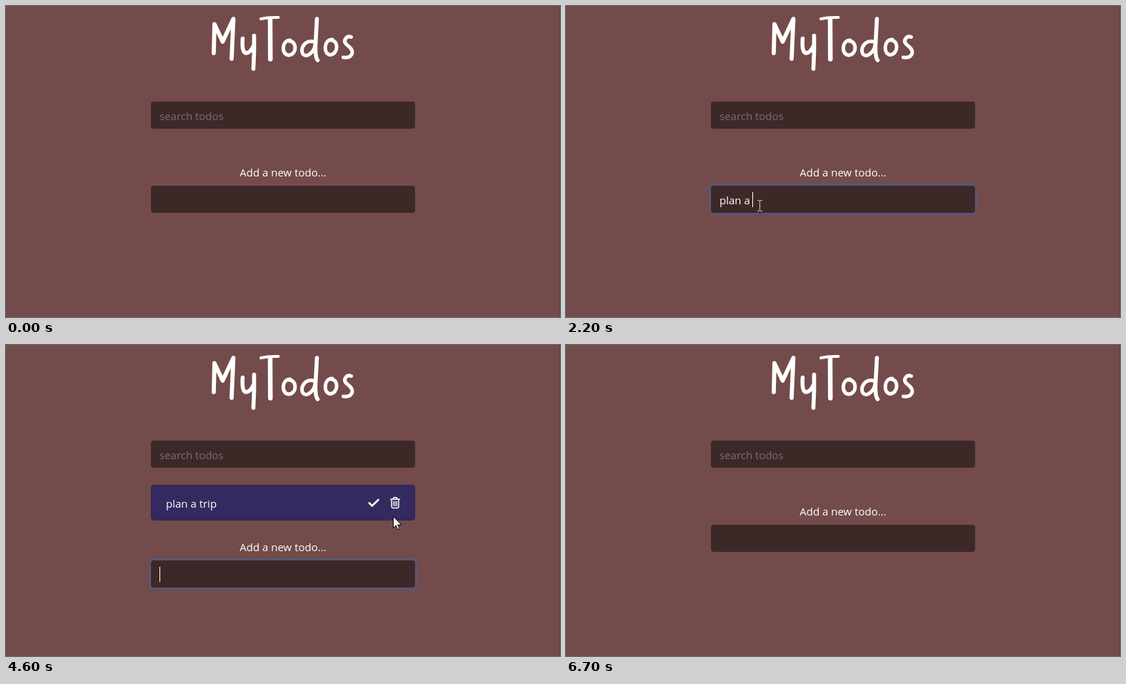
Write an HTML page that moves like this. It is 776 by 436 pixels and loops after 7100 ms.

```html
<!DOCTYPE html>
<html lang="en">
<head>
<meta charset="utf-8">
<title>Todo list</title>
<style>
  html, body { margin: 0; height: 100%; overflow: hidden; background: #734b4a; }
  svg { display: block; width: 100%; height: 100%; }
  text { font: 500 15px "Open Sans", "Noto Sans", sans-serif; fill: #fff; white-space: pre; }
  .field { fill: #3d2828; }
  .line { fill: none; stroke: #fff; stroke-linecap: round; stroke-linejoin: round; }
  .done text { fill: #858389; }
  .done .line { stroke: #858389; }
  .strike { display: none; }
  .done .strike { display: inline; }
  .pointer { fill: #fff; stroke: #000; stroke-linejoin: round; }
</style>
</head>
<body>
<svg viewBox="0 0 776 436">
  <rect x="775" width="1" height="436" opacity=".15"/>

  <g class="line" stroke-width="5.6" role="img" aria-label="MyTodos">
    <path d="M291 66 292 25.500 303.500 50 318.500 18 316 74" stroke-width="5.800"/>
    <path d="M331.500 45.500Q330 65.500 336 66 343 65.500 347 55M347.500 41.500Q348 66 346.500 88"/>
    <path d="M357 18Q368 15.500 381.500 16" stroke-width="4"/>
    <path d="M370 18 370.300 74.500" stroke-width="6.500"/>
    <path d="M398 48C386 47.500 385 68.500 396 69 408 68.500 408 48.500 396 49" stroke-width="5"/>
    <path d="M432 50.500C419 45.500 411 60.500 416 67.500 421 73.500 432 64.500 433 54.500" stroke-width="5"/>
    <path d="M435.500 18 433.500 55Q433 72 436.500 76"/>
    <path d="M457 47C445 46.500 444 67.500 454 68.500 466 67.500 466 47.500 455 48" stroke-width="5"/>
    <path d="M483.500 43.500C477 41 472 48 476 53 480 57 486 60 485 66 483 72 478 73 472.500 72" stroke-width="5"/>
  </g>

  <rect class="field" x="203" y="134" width="370" height="38" rx="4"/>
  <text x="215" y="160" style="fill:#716f7a">search todos</text>

  <g id="item">
    <rect x="203.500" y="196.500" width="369" height="49" rx="3.500" fill="#342a5f" stroke="#2d2453"/>
    <text x="224" y="228">plan a trip</text>
    <path id="check" class="line" stroke-width="2.600" d="M508.800 221.500l4 4 8.700-8.500"/>
    <g class="line" stroke-width="1.500">
      <path d="M538.700 216.200h12.800M542 216l1.200-2.300h3.800l1.200 2.300M540.200 216.500v10.300q0 1.700 1.700 1.700h6.400q1.700 0 1.700-1.700v-10.300"/>
      <path d="M542.900 219.200v6.300M545.100 219.200v6.300M547.300 219.200v6.300" stroke-width="1.200"/>
    </g>
    <path class="line strike" stroke-width="1" d="M224 223.500h72M507 222.500h16M538 222.500h14"/>
  </g>

  <g id="form">
    <text x="388" y="239" text-anchor="middle">Add a new todo...</text>
    <rect id="ring" x="200" y="249" width="376" height="44" rx="6.500" fill="#565777"/>
    <rect class="field" x="203" y="252" width="370" height="38" rx="4"/>
    <text id="typed" x="215" y="278"></text>
    <rect id="caret" y="261" width="1" height="21" fill="#fff"/>
  </g>

  <g id="mouse">
    <path id="arrow" class="pointer" d="M.5 .5V16.500L4.300 13 6.800 18.700 9.200 17.600 6.800 12H12Z"/>
    <path id="beam" fill="none" stroke="#d6cfcf" d="M-3-7.500H-1L.5-6.500 2-7.500H4M.5-6.500V6.500M-3 7.500H-1L.5 6.500 2 7.500H4"/>
    <path id="hand" class="pointer" transform="translate(-6)" d="M5 14V2.500Q5 .5 6.700 .5T8.400 2.500V7.500Q10.600 6.500 11.400 8.500 13.400 7.500 14.300 9.400 16.700 9 16.800 11.500V15.500L15.200 19V22.500H6.800V19.500L1 13.300Q.3 10.800 2.600 10.900Z"/>
  </g>
</svg>

<script>
const LOOP = 7100, STEP = 100;
const FOCUS = 700, ADD = 3400, DONE = 5800, REMOVE = 6500, LEAVE = 6700, BLINK = 500;

// time, x, y of the pointer
const track = [
  [100, 15, 293], [700, 271, 280], [3300, 271, 280], [3400, 269, 279],
  [4200, 269, 279], [4700, 574, 236], [5000, 513, 226], [5200, 513, 226],
  [5300, 512, 222], [5700, 512, 222], [6100, 541, 219], [6200, 541, 219],
  [6300, 541, 222], [LEAVE, 541, 222]
];

// time, number of letters typed
const typing = [[1700, 4], [1900, 5], [2000, 6], [2200, 7], [2700, 8], [2800, 9], [3100, 11]];

const $ = id => document.getElementById(id);
const show = (id, on) => $(id).style.display = on ? "inline" : "none";
const within = (v, a, b) => v >= a && v < b;

function pointerAt(t) {
  const i = track.findIndex(k => k[0] > t);
  if (i < 1) return null;
  const [t0, x0, y0] = track[i - 1], [t1, x1, y1] = track[i];
  const u = (t - t0) / (t1 - t0), e = u * u * (3 - 2 * u);
  return [x0 + (x1 - x0) * e, y0 + (y1 - y0) * e];
}

function lettersAt(t) {
  return t < ADD ? typing.reduce((n, [at, count]) => t >= at ? count : n, 0) : 0;
}

function caretOn(t) {
  if (!within(t, FOCUS, DONE)) return false;
  if (within(t, typing[0][0], ADD)) return true;
  return Math.floor((t - (t < ADD ? FOCUS : ADD)) / BLINK) % 2 === 0;
}

function draw(t) {
  const listed = within(t, ADD, REMOVE);
  const shift = listed ? 50 : 0;
  show("item", listed);
  $("item").setAttribute("class", t >= DONE ? "done" : "");
  $("form").setAttribute("transform", `translate(0 ${shift})`);
  show("ring", within(t, FOCUS, DONE));

  $("typed").textContent = "plan a trip".slice(0, lettersAt(t));
  $("caret").setAttribute("x", 215 + Math.floor($("typed").getComputedTextLength()));
  show("caret", caretOn(t));

  const p = pointerAt(t);
  show("mouse", p);
  let kind = "arrow", overCheck = false;
  if (p) {
    const [x, y] = p.map(Math.round);
    const onIcons = listed && within(y, 210, 232);
    overCheck = onIcons && within(x, 505, 525);
    if (overCheck || onIcons && within(x, 536, 554)) kind = "hand";
    else if (within(x, 203, 573) && within(y - shift, 252, 290)) kind = "beam";
    $("mouse").setAttribute("transform", `translate(${x} ${y})`);
  }
  for (const id of ["arrow", "beam", "hand"]) show(id, id === kind);
  $("check").setAttribute("opacity", overCheck && t < DONE ? .85 : 1);
}

const start = performance.now();
function tick() {
  const t = (performance.now() - start) % LOOP;
  draw(Math.floor(t / STEP) * STEP);
  requestAnimationFrame(tick);
}
tick();
</script>
</body>
</html>
```
